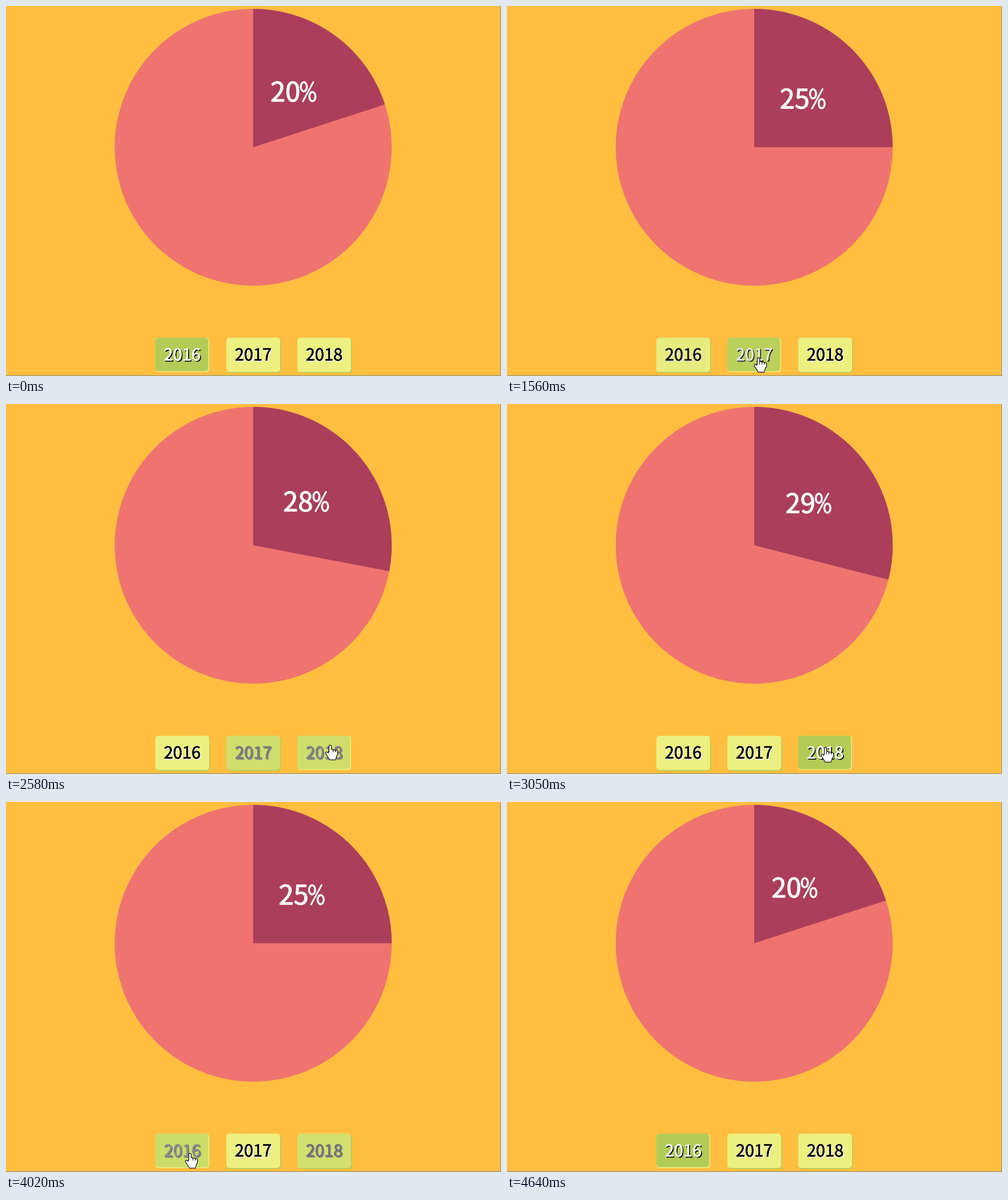
A matplotlib script that plays this animation: 865 px wide and 647 px high, repeating every 5.23 s.

```python
import numpy as np
import matplotlib.pyplot as plt
from matplotlib.animation import FuncAnimation
from matplotlib.patches import Circle, Ellipse, FancyBboxPatch, Polygon, Rectangle, Wedge
from matplotlib.patheffects import withStroke
from matplotlib.transforms import Affine2D

W, H, DPI = 865, 647, 100
LOOP_MS, STEP_MS = 5230, 10
FONT = "Noto Sans CJK JP"

BACKGROUND, PIE, SLICE = "#FFBE40", "#EF746F", "#AB3E5B"
LIGHT = np.array([236, 240, 129]) / 255
GREEN = np.array([179, 204, 87]) / 255
BLACK, WHITE = np.zeros(3), np.ones(3)

CENTER, RADIUS = (432, 247), 242
YEARS = ["2016", "2017", "2018"]
SHARES = [20, 25, 29]
PITCH, BUTTON_W, BUTTON_H, BUTTON_TOP, EDGE = 124, 94, 60, 580, 1.5
CLICKS = [(1310, 0, 1), (2460, 1, 2), (3890, 2, 0)]  # time, from, to
FADE_MS, COUNT_MS = 400, 32

# Pointer moves: start, end, destination of the tip
ENTRY, EXIT_MS = (441, 650), 4640
MOVES = [
    (530, 830, (439, 613)),
    (1080, 1130, (439, 614)),
    (1780, 1990, (565.5, 596)),
    (3040, 3050, (556, 600)),
    (3050, 3550, (320.5, 614)),
    (4090, 4240, (352, 648)),
    (4240, 4440, (724, 646)),
    (4440, EXIT_MS, (756, 643)),
]


def px(size):
    return size * 72 / DPI


def mix(a, b, k):
    return a + (b - a) * k


def smooth(k):
    return k * k * (3 - 2 * k)


def css_ease(k):
    s = np.linspace(0, 1, 101)
    x = 0.75 * s * (1 - s) ** 2 + 0.75 * s**2 * (1 - s) + s**3
    y = 0.3 * s * (1 - s) ** 2 + 3 * s**2 * (1 - s) + s**3
    return np.interp(k, x, y)


fig = plt.figure(figsize=(W / DPI, H / DPI), dpi=DPI, facecolor=BACKGROUND)
ax = fig.add_axes([0, 0, 1, 1])
ax.set_xlim(0, W)
ax.set_ylim(H, 0)
ax.axis("off")


def add_text(x, y, text, size, **style):
    return ax.text(x, y, text, family=FONT, fontsize=px(size), va="baseline", **style)


def ink(text, color, extra):
    """Colour a text and thicken its strokes by some pixels."""
    text.set_color(color)
    text.set_path_effects([withStroke(linewidth=px(extra), foreground=color)])


class Button:
    def __init__(self, index):
        x = CENTER[0] + PITCH * (index - 1)
        self.left = x - BUTTON_W / 2
        self.shadow, self.face = self.box(), self.box()
        self.text_shadow = add_text(x + 1.5, 621.5, YEARS[index], 29, ha="center")
        self.text = add_text(x, 620, YEARS[index], 29, ha="center")

    def box(self):
        return ax.add_patch(FancyBboxPatch((self.left, BUTTON_TOP), BUTTON_W, BUTTON_H, lw=0,
                                           boxstyle="round,pad=0,rounding_size=6"))

    def update(self, active, pressed):
        # The edge lies inside a pressed button and outside a raised one.
        inset, outset = (EDGE, 0) if pressed else (0, EDGE)
        self.shadow.set_x(self.left + outset)
        self.shadow.set_y(BUTTON_TOP + outset)
        self.shadow.set_facecolor(LIGHT if pressed else GREEN)
        self.face.set_width(BUTTON_W - inset)
        self.face.set_height(BUTTON_H - inset)
        self.face.set_facecolor(mix(LIGHT, GREEN, active))
        ink(self.text, mix(BLACK, WHITE, active), 0.6)
        ink(self.text_shadow, mix(WHITE, BLACK, active), 0.4)


class ShareLabel:
    """Two digits followed by a narrow percent sign."""

    def __init__(self):
        self.offset = Affine2D()
        place = self.offset + ax.transData
        self.digits = add_text(0, 0, "", 47, color="white", transform=place)
        ink(self.digits, "white", 1.1)
        for center in ((58.3, -25.7), (73.3, -8.5)):
            ax.add_patch(Ellipse(center, 10.5, 16, fill=False, ec="white", lw=px(3.4),
                                 transform=place))
        ax.plot([56, 75.5], [1, -35], color="white", lw=px(3), transform=place,
                solid_capstyle="butt")

    def update(self, share):
        angle = np.pi * share / 100
        x = CENTER[0] + RADIUS / 2 * np.sin(angle) - 41
        y = CENTER[1] - RADIUS / 2 * np.cos(angle) + 17.8
        self.offset.clear().translate(x, y)
        self.digits.set_text(str(share))


class Pointer:
    """A hand over the buttons, an arrow elsewhere."""

    def __init__(self):
        self.offset = Affine2D()
        place = self.offset + ax.transData
        palm = [(-1.5, 13), (12, 13), (12, 18), (10, 25.5), (0.5, 25.5), (-3, 20)]
        strokes = [((3.9 * i, 3.9 * i), (7.5 + i if i else 2, 16)) for i in range(4)]
        strokes.append(((-5, -1), (14.5, 20)))
        self.hand = []
        for color, width, z in (("black", 5.2, 5), ("white", 3, 6)):
            self.hand += [ax.plot(x, y, color=color, lw=px(width), zorder=z, transform=place,
                                  solid_capstyle="round")[0] for x, y in strokes]
            self.hand.append(ax.add_patch(Polygon(palm, color=color, lw=px(width - 2.7),
                                                  zorder=z, transform=place)))
        self.arrow = ax.add_patch(Polygon([(0, 0), (0, 17), (5, 13), (12, 12)], fc="white",
                                          ec="black", lw=px(1), zorder=5, transform=place))

    def update(self, t):
        tip = np.array(ENTRY)
        for start, end, goal in MOVES:
            k = np.clip((t - start) / (end - start), 0, 1)
            tip = mix(tip, np.array(goal), smooth(k))
        x, y = tip
        self.offset.clear().translate(x, y)
        shown = MOVES[0][0] <= t < EXIT_MS
        aside = (x - CENTER[0] + PITCH / 2) % PITCH - PITCH / 2
        over = (abs(aside) < BUTTON_W / 2 and abs(x - CENTER[0]) < 1.5 * PITCH
                and y < BUTTON_TOP + BUTTON_H)
        for part in self.hand:
            part.set_visible(shown and over)
        self.arrow.set_visible(shown and not over)


ax.add_patch(Circle(CENTER, RADIUS, fc=PIE, lw=0))
pie_slice = ax.add_patch(Wedge(CENTER, RADIUS, -90, 0, fc=SLICE, lw=0))
label = ShareLabel()
buttons = [Button(i) for i in range(len(YEARS))]
pointer = Pointer()
for x, y, w, h in ((W - 1, 0, 1, H), (0, H - 1, W, 1)):
    ax.add_patch(Rectangle((x, y), w, h, fc="#8C8A86", lw=0, zorder=9))


def state(t):
    """Share shown, fade level of each button and the selected one at time t."""
    share, levels, selected = SHARES[0], [1, 0, 0], 0
    for start, old, new in CLICKS:
        if t >= start:
            k = css_ease(min((t - start) / FADE_MS, 1))
            levels, selected = [0, 0, 0], new
            levels[old], levels[new] = 1 - k, k
            change = SHARES[new] - SHARES[old]
            steps = min((t - start) // COUNT_MS, abs(change))
            share = SHARES[old] + int(np.sign(change)) * steps
    return share, levels, selected


def update(frame):
    t = frame * STEP_MS
    share, levels, selected = state(t)
    pie_slice.set_theta2(-90 + 3.6 * share)
    label.update(share)
    for i, button in enumerate(buttons):
        button.update(levels[i], i == selected)
    pointer.update(t)
    return []


animation = FuncAnimation(fig, update, frames=LOOP_MS // STEP_MS, interval=STEP_MS,
                          repeat=True, repeat_delay=0, blit=False)
plt.show()
```
